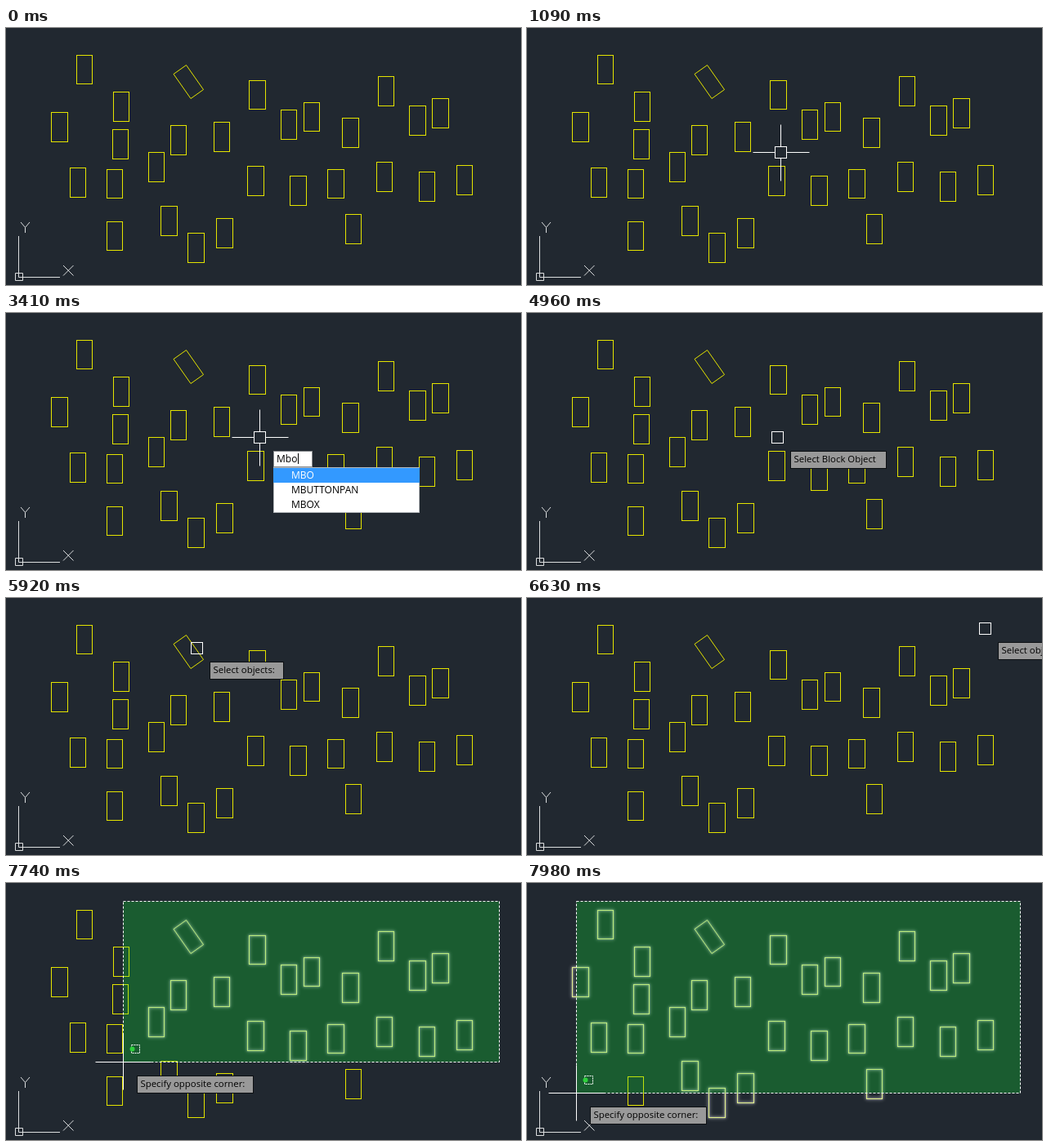
An HTML page that plays this animation: 630 by 315 pixels, repeating every 8 s.

```html
<!DOCTYPE html>
<html lang="en">
<head>
<meta charset="utf-8">
<title>Block selection</title>
<style>
  html, body { margin: 0; width: 100%; height: 100%; overflow: hidden; background: #212830; }
  svg { display: block; width: 630px; height: 315px; }
  text { font: 12px "Open Sans", "Noto Sans", sans-serif; fill: #000; }
  .line { fill: none; stroke: #fff; }
  .block { fill: none; stroke: #e4e400; }
  .block.on { stroke: #e2f08c; filter: drop-shadow(0 0 1px #fffa) drop-shadow(0 0 2px #fffa); }
  #ucs { stroke: #dcdedf; }
  #tip rect { fill: #999; stroke: #0d1013; }
  #tip text { font-size: 11.4px; }
  #edge { stroke-dasharray: 3 2; }
  .hide { display: none; }
</style>
</head>
<body>
<svg viewBox="0 0 630 315">
  <rect id="base" fill="#163c2d"/>
  <g id="blocks"></g>
  <rect id="tint" fill="#28dc3c" fill-opacity=".2"/>
  <rect id="edge" class="line"/>
  <path id="ucs" class="line" d="M15.5 255V305.5H66M11.5 300.5h9v9h-9zM18 238l5.5 6.5L29 238M23.5 244.5V251M70 291l12.5 12.5M82.5 291L70 303.5"/>
  <g id="cursor">
    <path id="cross" class="line"/>
    <rect id="pick" class="line" x="-7" y="-7" width="14" height="14"/>
    <g id="badge">
      <rect class="line" x="10" y="-21" width="10" height="10" stroke-dasharray="2 1"/>
      <circle cx="11" cy="-16" r="3" fill="#2fd03c"/>
    </g>
  </g>
  <g id="menus"></g>
  <g id="entry">
    <rect x="327.5" y="169.5" width="47" height="19" fill="#fff" stroke="#8a8d90"/>
    <text id="typed" x="331" y="183"></text>
    <path id="caret" stroke="#000"/>
  </g>
  <g id="tip"><rect height="21"/><text x="4.5" y="14"></text></g>
</svg>
<script>
const LOOP = 8000;
const $ = id => document.getElementById(id);
const set = (el, attrs) => { for (const k in attrs) el.setAttribute(k, attrs[k]); };
const show = (el, on) => el.classList.toggle('hide', !on);
const make = (parent, tag, attrs, text) => {
  const el = document.createElementNS('http://www.w3.org/2000/svg', tag);
  set(el, attrs);
  if (text) el.textContent = text;
  return parent.appendChild(el);
};

// Upright blocks as "x,y", grouped by pixel size
const groups = [
  [19, 35, '86,33 123,173 364,91 123,237'],
  [20, 35, '297,64 393,173'],
  [19, 36, '131,78 130,124 78,171 174,152 201,119 254,115 336,100 415,228 453,164 455,59 505,176 551,168'],
  [20, 36, '55,103 189,218 222,251 257,233 295,169 347,181 411,110 493,95 521,86']
];
const blocks = [];
for (const [w, h, spots] of groups) {
  for (const spot of spots.split(' ')) {
    const [x, y] = spot.split(',').map(Number);
    const el = make($('blocks'), 'rect', { class: 'block', x: x + .5, y: y + .5, width: w, height: h });
    blocks.push({ el, x, y, w, h, inert: spot === '123,237' });
  }
}
const tilted = {
  el: make($('blocks'), 'path', { class: 'block', d: 'M205 56.5L220.5 45.5L241.5 75.5L226 86.5Z' }),
  x: 205, y: 45, w: 37, h: 41
};
blocks.push(tilted);

// Suggestion lists
function menu(items, width, height, scroll) {
  const g = make($('menus'), 'g', {});
  const inner = width - (scroll ? 17 : 0);
  make(g, 'rect', { x: 327.5, y: 189.5, width: width - 1, height: height - 1, fill: '#fff', stroke: '#b4b8bb' });
  make(g, 'rect', { x: 327, y: 190, width: inner, height: 18, fill: '#3399ff' });
  items.forEach((s, i) => {
    make(g, 'text', { x: 349, y: 203 + 18 * i, style: i ? '' : 'fill:#fff' }, s);
  });
  if (scroll) {
    make(g, 'rect', { x: 568, y: 190, width: 17, height, fill: '#f0f0f0' });
    make(g, 'rect', { x: 569, y: 207, width: 15, height: 17, fill: '#cdcdcd' });
    make(g, 'path', { d: 'M573 200l3.5-3.5 3.5 3.5M573 306l3.5 3.5 3.5-3.5', fill: 'none', stroke: '#4c6c5c', 'stroke-width': 2 });
  }
  return g;
}
function brush(g, x, y) {
  make(g, 'path', { d: `M${x} ${y}l5-6`, stroke: '#8c929a', 'stroke-width': 3 });
  make(g, 'path', { d: `M${x - 7} ${y + 6}q2-7 6-8l4 4q-3 5-10 4z`, fill: '#8c4a32' });
}
const longMenu = menu(['M (MOVE)', 'MA (MATCHPROP)', 'MI (MIRROR)', 'MLEADERSTYLE', 'MBO', 'MT (MTEXT)', 'MLD (MLEADER)'], 258, 130, true);
make(longMenu, 'rect', { x: 335, y: 198, width: 4, height: 4, fill: '#3f8c9c' });
make(longMenu, 'rect', { x: 330.5, y: 210.5, width: 10, height: 9, fill: '#dce6f8', stroke: '#2c4078' });
make(longMenu, 'rect', { x: 332, y: 212, width: 5, height: 5, fill: '#3c68c0' });
brush(longMenu, 340, 218);
make(longMenu, 'path', { d: 'M335 229v12h-6z', fill: '#c4d0dc' });
make(longMenu, 'path', { d: 'M338 229v12h6z', fill: '#7ca4cc' });
brush(longMenu, 338, 253);
make(longMenu, 'circle', { cx: 341.5, cy: 303.5, r: 2.5, fill: '#d0d4f0', stroke: '#303c78' });
const shortMenu = menu(['MBO', 'MBUTTONPAN', 'MBOX'], 179, 56, false);

// Cursor runs: start, end, step count, then waypoints [step, x, y]
const runs = [
  [60, 760, 12, [0, 481, 221], [3, 437, 193], [7, 361, 146], [11, 329, 128]],
  [900, 1090, 4, [0, 326, 132], [3, 310, 152]],
  [4960, 5150, 4, [0, 306, 152], [1, 289, 127], [2, 259, 84], [3, 247, 66]],
  [5290, 5600, 6, [0, 245, 66], [5, 233, 61]],
  [6110, 6890, 12, [0, 236, 63], [1, 256, 64], [4, 448, 53], [7, 560, 37], [11, 587, 30]],
  [6960, 7080, 3, [0, 594, 26], [2, 603, 22]],
  [7220, 7980, 13, [0, 603, 22], [2, 560, 46], [4, 437, 118], [5, 342, 148], [7, 185, 200], [9, 100, 237], [11, 69, 253], [12, 60, 257]]
];
const corner = [603, 22];

function along(points, k) {
  let i = 1;
  while (i < points.length - 1 && points[i][0] < k) i++;
  const [k0, x0, y0] = points[i - 1], [k1, x1, y1] = points[i];
  const p = (k - k0) / (k1 - k0);
  return [Math.round(x0 + (x1 - x0) * p), Math.round(y0 + (y1 - y0) * p)];
}

// Position at time t, optionally some steps behind
function locate(t, lag = 0) {
  const [from, to, n, ...points] = runs.filter(r => r[0] <= t).pop() || runs[0];
  const k = Math.min(n - 1, Math.floor((t - from + 10) * (n - 1) / (to - from)));
  return along(points, Math.max(0, k - lag));
}

const prompts = [
  [4050, 'Select Block Object', 117],
  [5920, 'Select objects:', 90],
  [7220, 'Specify opposite corner:', 142]
];
const words = [[2130, 'M', 342.5], [2580, 'Mb', 349.5], [3220, 'Mbo', 357.5]];
const latest = (list, t) => list.filter(e => e[0] <= t).pop();

function draw(t) {
  const within = (a, b) => t >= a && t < b;
  const [x, y] = locate(t);
  const windowed = t >= 7220;
  const picking = within(4050, 7220);

  show($('cursor'), t >= 60);
  set($('cursor'), { transform: `translate(${x + .5} ${y + .5})` });
  show($('cross'), !picking);
  show($('pick'), !windowed);
  show($('badge'), windowed);
  set($('cross'), { d: windowed ? 'M-34 0H34M0-34V34' : 'M-34 0H-7M7 0H35M0-34V-7M0 7V35' });

  show($('entry'), within(2130, 3930));
  show(longMenu, within(2580, 2840));
  show(shortMenu, within(3410, 3930));
  const word = latest(words, t);
  if (word) {
    $('typed').textContent = word[1];
    set($('caret'), { d: `M${word[2]} 172v13` });
  }

  const prompt = latest(prompts, t);
  show($('tip'), prompt);
  if (prompt) {
    set($('tip'), { transform: `translate(${x + (windowed ? 17 : 16)} ${y + 17})` });
    set($('tip').firstElementChild, { x: .5, y: .5, width: prompt[2] });
    $('tip').lastElementChild.textContent = prompt[1];
  }

  const box = { x: x + .5, y: corner[1] + .5, width: corner[0] - x, height: y - corner[1] };
  for (const id of ['base', 'tint', 'edge']) {
    show($(id), windowed);
    if (windowed) set($(id), box);
  }
  const [hx, hy] = locate(t, 1);
  for (const b of blocks) {
    const caught = windowed && !b.inert && b.x + b.w > hx && b.x < corner[0] && b.y < hy;
    b.el.classList.toggle('on', caught || (b === tilted && within(5410, 5920)));
  }
}

function tick() {
  draw(performance.now() % LOOP);
  requestAnimationFrame(tick);
}
tick();
</script>
</body>
</html>
```
